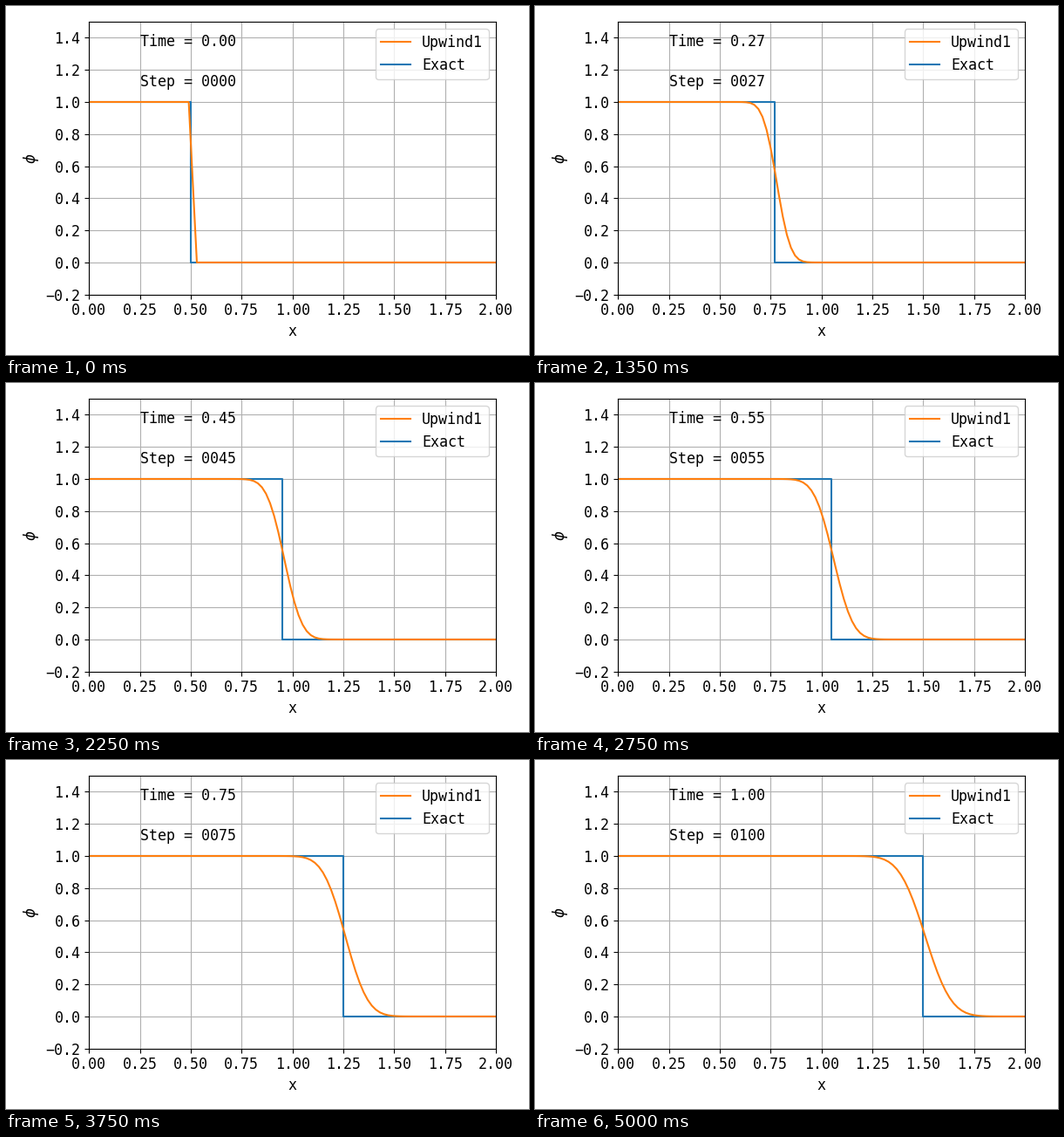
Write a matplotlib script that moves like this. It is 600x400 px and loops after 5050 ms.

```python
import numpy as np
import matplotlib.pyplot as plt
from matplotlib.animation import FuncAnimation

plt.rcParams["font.family"] = "DejaVu Sans Mono"
plt.rcParams["font.size"] = 12

LENGTH = 2.0
DX = 0.02
DT = 0.01
SPEED = 1.0
X0 = 0.5
STEPS = 101
CFL = SPEED * DT / DX

# Cell centres with one ghost cell on each side
x = np.arange(-0.5 * DX, LENGTH + DX, DX)


def upwind_history():
    phi = np.where(x < X0, 1.0, 0.0)
    history = []
    for _ in range(STEPS):
        phi[1:] -= CFL * np.diff(phi)
        history.append(phi.copy())
    return history


history = upwind_history()

fig, ax = plt.subplots(figsize=(6, 4), dpi=100)
exact, = ax.plot([], [], color="C0", label="Exact")
upwind, = ax.plot([], [], color="C1", label="Upwind1")
time_text = ax.text(0.25, 1.35, "Time = 0.00")
step_text = ax.text(0.25, 1.10, "Step = 0000")

ax.set_xlim(0, LENGTH)
ax.set_ylim(-0.2, 1.5)
ax.set_xlabel("x")
ax.set_ylabel(r"$\phi$")
ax.grid(True)
ax.legend(handles=[upwind, exact], loc="upper right")
fig.tight_layout()


def update(step):
    t = step * DT
    front = X0 + SPEED * t
    exact.set_data([0, front, front, LENGTH], [1, 1, 0, 0])
    upwind.set_data(x, history[step])
    time_text.set_text(f"Time = {t:.2f}")
    step_text.set_text(f"Step = {step:04d}")
    return exact, upwind, time_text, step_text


anim = FuncAnimation(fig, update, frames=STEPS, interval=50,
                     init_func=lambda: update(0), repeat=True, repeat_delay=0)
plt.show()
```
